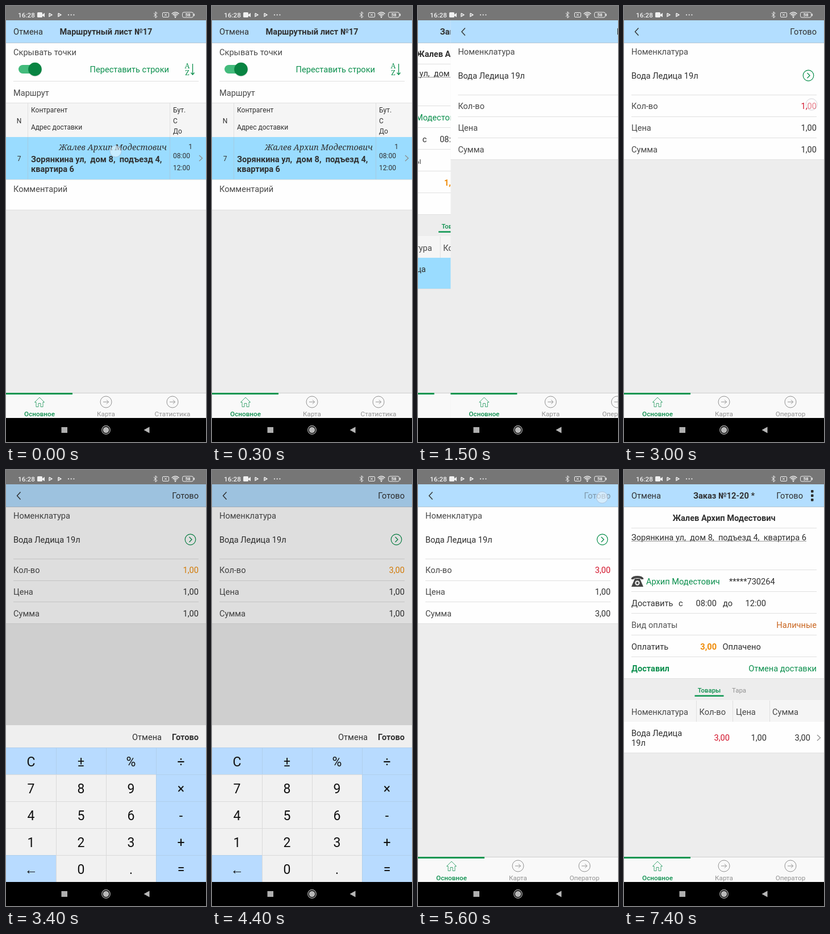
Animation, 352 px wide and 762 px high, one loop 7700 ms. Source, as an HTML page with a canvas:

```html
<!DOCTYPE html>
<html lang="ru">
<head>
<meta charset="utf-8">
<style>
html, body { margin: 0; width: 100%; height: 100%; overflow: hidden; background: #000; }
canvas { display: block; width: 352px; height: 762px; }
</style>
</head>
<body>
<canvas id="stage"></canvas>
<script>
const W = 352, H = 762, LOOP = 7700, STEP = 100;
const canvas = document.getElementById('stage');
const ctx = canvas.getContext('2d');
const ratio = window.devicePixelRatio || 1;
canvas.width = W * ratio;
canvas.height = H * ratio;

const GREEN = '#0b8f4d', INK = '#303030', LABEL = '#484848', RED = '#d3142b', ORANGE = '#ef8b08';
const HEADER = '#b3deff', SELECTED = '#9adcff', GREY = '#ededed', LINE = '#e0e0e0', MUTED = '#929292';
const CLIENT = 'Жалев Архип Модестович';
const STREET = 'Зорянкина ул,  дом 8,  подъезд 4,';
const FLAT = 'квартира 6';

function rect(x, y, w, h, color) {
  ctx.fillStyle = color;
  ctx.fillRect(x, y, w, h);
}

// y is the middle of the capital letters
function text(str, x, y, { size = 14.6, color = INK, weight = 400, align = 'left', font = 'Roboto, sans-serif', style = '' } = {}) {
  ctx.font = `${style} ${weight} ${size}px ${font}`;
  ctx.textAlign = align;
  ctx.fillStyle = color;
  ctx.fillText(str, x, y + size * 0.355);
  return ctx.measureText(str).width;
}

function path(points, color, width = 1, fill = false) {
  ctx.beginPath();
  for (let i = 0; i < points.length; i += 2) ctx.lineTo(points[i], points[i + 1]);
  if (fill) {
    ctx.fillStyle = color;
    ctx.fill();
  } else {
    ctx.strokeStyle = color;
    ctx.lineWidth = width;
    ctx.stroke();
  }
}

function circle(x, y, r, { fill, stroke, width = 1 }) {
  ctx.beginPath();
  ctx.arc(x, y, r, 0, Math.PI * 2);
  if (fill) { ctx.fillStyle = fill; ctx.fill(); }
  if (stroke) { ctx.strokeStyle = stroke; ctx.lineWidth = width; ctx.stroke(); }
}

function roundRect(x, y, w, h, r, color, outline = false) {
  ctx.beginPath();
  ctx.roundRect(x, y, w, h, r);
  ctx[outline ? 'strokeStyle' : 'fillStyle'] = color;
  ctx.lineWidth = 1;
  ctx[outline ? 'stroke' : 'fill']();
}

const divider = y => rect(13, y, 326, 1, LINE);
const chevron = (x, y) => path([x - 3, y - 5, x + 2.5, y, x - 3, y + 5], '#8b8b8b', 1.2);

function statusBar() {
  const white = '#f0f0f0';
  rect(0, 0, W, 25, '#767676');
  text('16:28', 21, 15.5, { size: 11.8, weight: 500, color: white });
  roundRect(55, 11, 9, 9, 1.5, white);
  path([64, 15, 68, 12, 68, 19.5, 64, 17], white, 1, true);
  for (const x of [76, 92]) path([x, 12.7, x + 4.8, 15.5, x, 18.3, x, 12.7], white, 1.5);
  for (const x of [110, 114.7, 119.4]) circle(x, 15.5, 1.1, { fill: white });
  path([260, 12.5, 266, 18.5, 263, 21, 263, 10, 266, 12.5, 260, 18.5], white, 1);
  roundRect(275.5, 11.5, 11, 8, 1.5, white, true);
  path([279, 13.5, 283, 17.5], white);
  path([283, 13.5, 279, 17.5], white);
  for (const r of [3, 5.7, 8.5]) {
    ctx.beginPath();
    ctx.arc(298, 19.5, r, -Math.PI * 0.77, -Math.PI * 0.23);
    ctx.strokeStyle = white;
    ctx.lineWidth = 1.4;
    ctx.stroke();
  }
  circle(298, 19.5, 1.3, { fill: white });
  roundRect(310.5, 11, 19, 9, 2.5, white, true);
  rect(330.5, 13.5, 1.5, 4, white);
  text('58', 320, 15.6, { size: 8, weight: 700, color: white, align: 'center' });
}

function navBar() {
  rect(0, 720, W, 42, '#000');
  rect(97.5, 736, 10.5, 10, '#b0b0b0');
  circle(176, 741, 7.3, { stroke: '#b8b8b8', width: 1.2 });
  circle(176, 741, 5.3, { fill: '#b8b8b8' });
  path([242.5, 741, 252.5, 735.5, 252.5, 746.5], '#b8b8b8', 1, true);
}

function page(whiteBottom) {
  rect(0, 25, W, 695, GREY);
  rect(0, 25, W, 40, HEADER);
  rect(0, 64, W, 1, '#b4c6d4');
  rect(0, 65, W, whiteBottom - 65, '#fefefe');
  rect(0, whiteBottom, W, 1, LINE);
}

function tabBar(lastTab) {
  rect(0, 677, W, 43, '#f9f9f9');
  rect(0, 676, W, 1, '#cfcfcf');
  rect(0, 676, 117, 3, '#0b9650');
  path([50.5, 692.5, 59, 684, 67.5, 692.5, 65, 692.5, 65, 700.5, 61, 700.5, 61, 694.5,
    57, 694.5, 57, 700.5, 53, 700.5, 53, 692.5, 50.5, 692.5], '#2f9f68', 0.9);
  for (const x of [176, 293]) {
    circle(x, 692, 10, { stroke: MUTED });
    path([x - 5, 692, x + 4.5, 692], MUTED);
    path([x + 1, 688.5, x + 4.5, 692, x + 1, 695.5], MUTED);
  }
  const tab = { size: 11.7, color: MUTED, align: 'center' };
  text('Основное', 59, 713, { ...tab, color: GREEN, weight: 500 });
  text('Карта', 176, 713, tab);
  text(lastTab, 293, 713, tab);
}

function routePage() {
  const small = { size: 12 };
  page(356);
  text('Отмена', 13, 45);
  text('Маршрутный лист №17', 176, 45, { weight: 700, align: 'center' });
  text('Скрывать точки', 13, 81, { color: LABEL });
  roundRect(22, 103, 34, 15, 7.5, '#43bb7c');
  circle(51, 111.5, 12, { fill: 'rgba(0,0,0,.12)' });
  circle(51, 110.5, 11.8, { fill: '#088442' });
  text('Переставить строки', 287, 111, { color: GREEN, align: 'right' });
  const sort = { size: 12.5, color: GREEN, align: 'center', font: '"Noto Serif", serif' };
  text('A', 319, 105, sort);
  text('Z', 319, 117, sort);
  path([328.5, 101, 328.5, 120], GREEN, 1.3);
  path([325.5, 116.5, 328.5, 120, 331.5, 116.5], GREEN, 1.3);
  divider(131);
  text('Маршрут', 13, 152, { color: LABEL });

  rect(0, 169, W, 60, '#f5f5f5');
  rect(0, 169, W, 1, LINE);
  rect(0, 229, W, 74, SELECTED);
  for (const x of [38, 288]) {
    rect(x, 170, 1, 59, LINE);
    rect(x, 229, 1, 74, '#a4cbe2');
  }
  rect(0, 303, W, 1, LINE);
  text('N', 23, 201, { ...small, align: 'center' });
  text('Контрагент', 44, 182, small);
  text('Адрес доставки', 44, 212, small);
  text('Бут.', 294, 182, small);
  text('С', 294, 201, small);
  text('До', 294, 219, small);
  text('7', 23, 267, { ...small, align: 'center' });
  text(CLIENT, 283, 247, { align: 'right', style: 'italic', font: '"Noto Serif", serif' });
  text(STREET, 44, 267.5, { weight: 700 });
  text(FLAT, 44, 284.5, { weight: 700 });
  text('1', 328, 246, { ...small, align: 'right' });
  text('08:00', 294, 262, small);
  text('12:00', 294, 283, small);
  chevron(343, 266);
  text('Комментарий', 13, 320, { color: LABEL });
  tabBar('Статистика');
}

function telephone() {
  const dark = '#444';
  ctx.beginPath();
  ctx.moveTo(14.5, 191);
  ctx.bezierCurveTo(15, 185.5, 32, 185.5, 32.5, 191);
  ctx.strokeStyle = dark;
  ctx.lineWidth = 4;
  ctx.stroke();
  path([19, 190, 28, 190, 34, 204, 13, 204], dark, 1, true);
  circle(23.5, 197.5, 4.2, { fill: '#e8e8e8' });
  circle(23.5, 197.5, 2, { fill: dark });
}

function orderPage({ quantity, title, selected }) {
  const right = { align: 'right' };
  page(364);
  text('Отмена', 13, 45);
  text(title, 176, 45, { weight: 700, align: 'center' });
  text('Готово', 315, 45, right);
  for (const y of [37, 44.5, 52]) roundRect(329, y - 2, 4.5, 4.5, 1, '#2c2c2c');

  text(CLIENT, 176, 84, { weight: 700, align: 'center' });
  divider(101);
  const width = text(`${STREET}  ${FLAT}`, 13, 118);
  rect(13, 124, width, 1, '#9a9a9a');
  divider(174);
  telephone();
  text(CLIENT.slice(CLIENT.indexOf(' ') + 1), 39, 195, { color: GREEN });
  text('*****730264', 185, 195);
  divider(212);
  text('Доставить', 13, 233);
  text('с', 96, 233);
  text('08:00', 126.5, 233);
  text('до', 174, 233);
  text('12:00', 213.5, 233);
  divider(250);
  text('Вид оплаты', 13, 271, { color: '#555' });
  text('Наличные', 339, 271, { ...right, color: '#c9651f' });
  divider(288);
  text('Оплатить', 13, 309);
  text(quantity, 163, 309, { ...right, weight: 700, color: ORANGE });
  text('Оплачено', 173.5, 309);
  divider(326);
  text('Доставил', 13, 347, { weight: 700, color: GREEN });
  text('Отмена доставки', 339, 347, { ...right, color: GREEN });

  text('Товары', 150, 385, { size: 11.4, weight: 500, color: GREEN, align: 'center' });
  text('Тара', 202.5, 385, { size: 11.4, color: MUTED, align: 'center' });
  rect(124.5, 393.5, 51, 2.5, '#0b9650');
  rect(0, 402, W, 38, '#f5f5f5');
  for (const x of [127, 191, 256]) rect(x, 403, 1, 37, LINE);
  text('Номенклатура', 13, 422.5, { color: LABEL });
  text('Кол-во', 132.5, 422.5, { color: LABEL });
  text('Цена', 197, 422.5, { color: LABEL });
  text('Сумма', 261, 422.5, { color: LABEL });
  rect(0, 440, W, 54, selected ? SELECTED : '#fefefe');
  rect(0, 494, W, 1, LINE);
  text('Вода Ледица', 13, 460);
  text('19л', 13, 476.5);
  text(quantity, 186, 468, { ...right, color: RED });
  text('1,00', 251, 468, right);
  text(quantity, 328, 468, right);
  chevron(343, 468);
  tabBar('Оператор');
}

function itemPage({ quantity, sum, editing, donePressed }) {
  const right = { align: 'right' };
  page(268);
  path([25.5, 38.5, 19.5, 45, 25.5, 51.5], '#333', 1.4);
  text('Готово', 339, 45, { ...right, color: donePressed ? '#7d95a6' : INK });
  text('Номенклатура', 13, 80, { color: LABEL });
  text('Вода Ледица 19л', 13, 122);
  circle(324.5, 121.5, 9.3, { stroke: GREEN, width: 1.2 });
  path([322.5, 117, 327, 121.5, 322.5, 126], GREEN, 1.3);
  divider(155);
  text('Кол-во', 13, 175, { color: LABEL });
  text(quantity, 339, 175, { ...right, color: editing ? ORANGE : RED });
  divider(193);
  text('Цена', 13, 213, { color: LABEL });
  text('1,00', 339, 213, right);
  divider(230);
  text('Сумма', 13, 251, { color: LABEL });
  text(sum, 339, 251, right);
  tabBar('Оператор');
}

function keyboard(shown, pressedKey) {
  if (shown <= 0) return;
  rect(0, 25, W, 695, `rgba(0,0,0,${0.125 * shown})`);
  ctx.save();
  ctx.translate(0, Math.round(274 * (1 - shown)));
  rect(0, 446, W, 39, '#efefef');
  text('Отмена', 274, 466.5, { align: 'right' });
  text('Готово', 339, 466.5, { align: 'right', weight: 700 });
  ['C±%÷', '789×', '456-', '123+', '←0.='].forEach((row, r) => {
    [...row].forEach((key, c) => {
      const x = c * 88, y = 485 + r * 47;
      const blue = r === 0 || c === 3 || key === '←';
      rect(x, y, 88, 47, key === pressedKey ? '#d4d4d4' : blue ? '#b8dbff' : '#f1f1f1');
      rect(x, y, 88, 1, blue ? '#b0cfec' : '#dadada');
      if (c) rect(x, y, 1, 47, blue ? '#b0cfec' : '#dadada');
      text(key, x + 44, y + 25, { size: 23, color: '#111', align: 'center' });
    });
  });
  ctx.restore();
}

// accelerate, then decelerate
function ease(t, start, duration) {
  const p = Math.min(1, Math.max(0, (t - start) / duration));
  return (1 - Math.cos(Math.PI * p)) / 2;
}

function shifted(x, draw) {
  ctx.save();
  ctx.translate(x, 0);
  draw();
  ctx.restore();
}

// p: 0 shows only the lower page, 1 only the upper one
function slide(p, lower, upper) {
  if (p < 1) shifted(-W * 0.3 * p, lower);
  if (p > 0) shifted(W * (1 - p), upper);
}

const touches = [
  { from: 0, x: 193, y: 254 },
  { from: 1100, x: 174, y: 470 },
  { from: 3000, x: 330, y: 172 },
  { from: 4200, x: 220, y: 650 },
  { from: 4700, x: 315, y: 466 },
  { from: 5600, x: 324, y: 48 }
];

function drawTouch(t) {
  for (const { from, x, y } of touches) {
    if (t < from || t >= from + 200) continue;
    ctx.globalAlpha = t < from + 100 ? 1 : 0.5;
    circle(x, y, 10, { fill: 'rgba(255,255,255,.45)', stroke: 'rgba(150,150,165,.4)' });
    ctx.globalAlpha = 1;
  }
}

function draw(t) {
  ctx.setTransform(ratio, 0, 0, ratio, 0, 0);
  const order = () => orderPage(t < 5600
    ? { quantity: '1,00', title: 'Заказ №12-20', selected: t >= 1100 }
    : { quantity: '3,00', title: 'Заказ №12-20 *', selected: false });
  const item = () => itemPage({
    quantity: t < 4300 ? '1,00' : '3,00',
    sum: t < 4800 ? '1,00' : '3,00',
    editing: t >= 3100 && t < 5200,
    donePressed: t >= 5600 && t < 5800
  });

  if (t < 1100) slide(ease(t, 350, 340), routePage, order);
  else slide(ease(t, 1250, 340) - ease(t, 5900, 390), order, item);
  keyboard(ease(t, 3100, 300) - ease(t, 4912, 300), t >= 4200 && t < 4400 ? '3' : '');
  drawTouch(t);
  statusBar();
  navBar();
}

const start = performance.now();
function tick() {
  const t = (performance.now() - start) % LOOP;
  draw(Math.floor(t / STEP) * STEP);
  requestAnimationFrame(tick);
}
tick();
</script>
</body>
</html>
```
